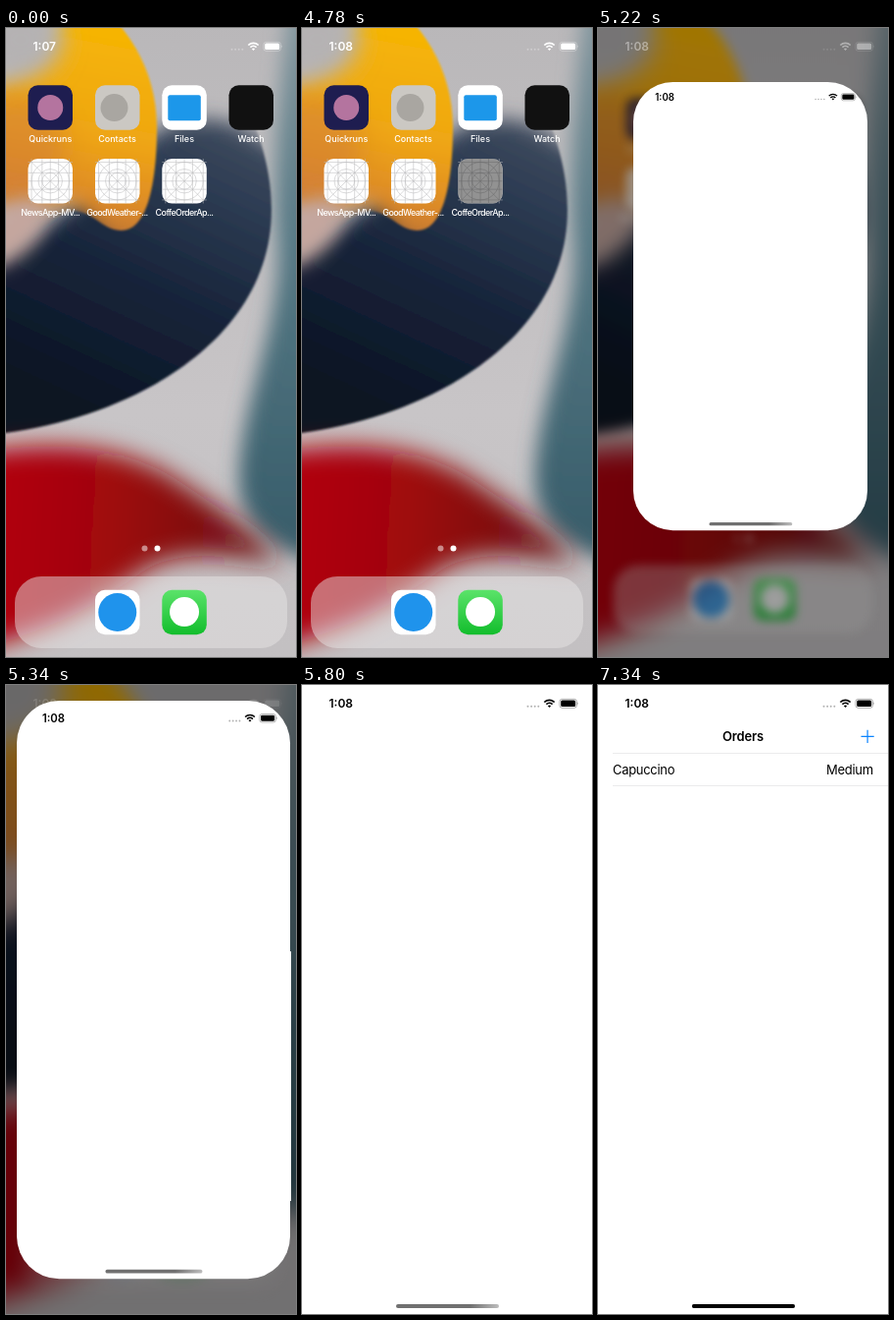
These frames come from a looping animation (296 by 640 pixels, 8 s). An HTML page:

```html
<!DOCTYPE html>
<html lang="en">
<head>
<meta charset="utf-8">
<title>App launch</title>
<style>
  html, body { margin: 0; width: 100%; height: 100%; overflow: hidden; background: #fff; }
  body { font-family: Inter, Roboto, "Liberation Sans", sans-serif; }
  svg { display: block; position: absolute; left: 0; top: 0; overflow: visible; }
  .stage { position: absolute; left: 0; top: 0; width: 296px; height: 640px; overflow: hidden; }
  .layer { position: absolute; inset: 0; }

  .wall, .home, .dim, .status, .early, .late, .press, .window, .nav, .bar-on, .rows {
    animation: 8s step-end infinite;
  }

  /* home screen */
  .wall { animation-name: wall; }
  .home { animation-name: home; }
  .dim { background: #000; animation-name: dim; }
  .status { color: #fff; animation-name: status; }
  .early { animation-name: early; }
  .late { animation-name: late; }
  .press { animation-name: press; }
  .dock {
    position: absolute; left: 9px; top: 558px; width: 278px; height: 73px;
    border-radius: 27px; background: rgba(232, 229, 230, .48); backdrop-filter: blur(9px);
  }
  .label { font-size: 9px; font-weight: 500; fill: #fff; text-anchor: middle; }
  .tight { letter-spacing: -.6px; }
  .clock { font-size: 12px; font-weight: 600; fill: currentColor; }

  /* app window */
  .window {
    position: absolute; left: 0; top: 0; width: 296px; height: 640px;
    overflow: hidden; background: #fff; color: #000;
    transform-origin: 0 0; animation-name: open;
  }
  .bar { position: absolute; left: 95.5px; bottom: 6px; width: 105px; height: 4px; border-radius: 2px; }
  .bar-off { background: linear-gradient(90deg, #707070 72%, #bdbdbd); }
  .bar-on { background: #000; animation-name: barOn; }
  .nav { animation-name: nav; }
  .rows { animation-name: rows; }
  .title { font-size: 13px; font-weight: 600; text-anchor: middle; letter-spacing: -.15px; }
  .cell { font-size: 13px; letter-spacing: -.3px; }

  @keyframes early { 0% { opacity: 1 } 18.375%, 100% { opacity: 0 } }
  @keyframes late { 0% { opacity: 0 } 18.375%, 100% { opacity: 1 } }
  @keyframes press { 0% { opacity: 0 } 59.75%, 100% { opacity: .43 } }
  @keyframes wall {
    0% { filter: none }
    63.75% { filter: blur(2px) }
    65.25% { filter: blur(6px) }
    66.75%, 100% { filter: blur(10px) }
  }
  @keyframes home {
    0% { filter: none; transform: none; opacity: 1 }
    63.75% { filter: blur(2px); transform: scale(.985); opacity: .95 }
    65.25% { filter: blur(5px); transform: scale(.952); opacity: .75 }
    66.75%, 100% { filter: blur(9px); transform: scale(.94); opacity: .5 }
  }
  @keyframes dim {
    0% { opacity: 0 }
    63.75% { opacity: .12 }
    65.25% { opacity: .35 }
    66.75% { opacity: .42 }
    68.125%, 100% { opacity: .46 }
  }
  @keyframes status {
    0% { opacity: 1 }
    63.75% { opacity: .85 }
    65.25% { opacity: .42 }
    66.75% { opacity: .15 }
    68.125%, 100% { opacity: 0 }
  }
  @keyframes open {
    0% { opacity: 0; transform: none; height: 640px; border-radius: 0 }
    63.75% { opacity: 1; transform: translate(124px, 122px) scale(.345); height: 325px; border-radius: 58px }
    65.25% { opacity: 1; transform: translate(36px, 55px) scale(.8074); height: 564.8px; border-radius: 50px }
    66.75% { opacity: 1; transform: translate(11px, 16px) scale(.9426); height: 624px; border-radius: 46px }
    68.125% { opacity: 1; transform: translate(3px, 5px) scale(.9814); height: 636px; border-radius: 43px }
    69.5% { opacity: 1; transform: translate(1px, 1.6px) scale(.9935); height: 639.2px; border-radius: 42px }
    71% { opacity: 1; transform: translate(.3px, .5px) scale(.998); height: 640px; border-radius: 42px }
    72.5%, 100% { opacity: 1; transform: none; height: 640px; border-radius: 0 }
  }
  @keyframes nav { 0% { opacity: 0 } 83.125%, 100% { opacity: 1 } }
  @keyframes barOn {
    0% { opacity: 0 }
    83.125% { opacity: .25 }
    84.625% { opacity: .5 }
    86.125% { opacity: .75 }
    87.625%, 100% { opacity: 1 }
  }
  @keyframes rows { 0% { opacity: 0 } 91.75%, 100% { opacity: 1 } }
</style>
</head>
<body>
<div class="stage">

  <svg class="wall" width="296" height="640">
    <defs>
      <filter id="b1" x="-20%" y="-20%" width="140%" height="140%"><feGaussianBlur stdDeviation="1.2"/></filter>
      <filter id="b10" x="-60%" y="-40%" width="220%" height="180%"><feGaussianBlur stdDeviation="10"/></filter>
      <filter id="b14" x="-60%" y="-60%" width="220%" height="220%"><feGaussianBlur stdDeviation="13"/></filter>
      <linearGradient id="base" x2="0" y2="1">
        <stop stop-color="#b8b6b8"/><stop offset=".6" stop-color="#c8c5c7"/><stop offset="1" stop-color="#c2bfc1"/>
      </linearGradient>
      <linearGradient id="navy" gradientUnits="userSpaceOnUse" x1="70" y1="390" x2="210" y2="90">
        <stop stop-color="#0a1322"/><stop offset=".45" stop-color="#17243a"/>
        <stop offset=".8" stop-color="#2d3c53"/><stop offset="1" stop-color="#3f4b5e"/>
      </linearGradient>
      <linearGradient id="gold" gradientUnits="userSpaceOnUse" x1="110" y1="0" x2="70" y2="215">
        <stop stop-color="#f6b504"/><stop offset=".5" stop-color="#efa613"/>
        <stop offset=".8" stop-color="#dd8a28"/><stop offset="1" stop-color="#b87038"/>
      </linearGradient>
      <linearGradient id="red" gradientUnits="userSpaceOnUse" x1="0" y1="520" x2="262" y2="535">
        <stop stop-color="#b0040e"/><stop offset=".4" stop-color="#a0070f"/>
        <stop offset=".75" stop-color="#800c11"/><stop offset="1" stop-color="#6e1a1a"/>
      </linearGradient>
      <linearGradient id="teal" gradientUnits="userSpaceOnUse" x1="0" y1="0" x2="0" y2="500">
        <stop stop-color="#7f949c"/><stop offset=".45" stop-color="#557884"/><stop offset="1" stop-color="#3a5f6c"/>
      </linearGradient>
      <clipPath id="navyEdge"><path d="M-60 420L0 412C125 396 271 320 271 185C271 130 250 90 235 50L-60-40Z"/></clipPath>
      <clipPath id="goldEdge"><path d="M70-40C125-10 154 45 154 100C154 165 142 206 118 206C100 206 92 190 72 186C45 184 20 230-60 270V-60H70Z"/></clipPath>
    </defs>
    <rect x="-40" y="-40" width="376" height="720" fill="url(#base)"/>
    <path d="M290-40C280 60 270 150 277 220C282 300 240 380 238 455C237 500 262 530 340 552V-40Z" fill="url(#teal)" filter="url(#b10)"/>
    <g filter="url(#b1)"><g clip-path="url(#navyEdge)">
      <path d="M-80 280C0 225 60 190 110 150C150 92 200 84 238 100C270 118 325 150 325 200V480H-80Z" fill="url(#navy)" filter="url(#b10)"/>
    </g></g>
    <g filter="url(#b1)"><g clip-path="url(#goldEdge)">
      <path d="M62-60C55 20 30 60-60 70V170C0 190 30 188 70 178L110 225H200V-60Z" fill="url(#gold)" filter="url(#b10)"/>
      <ellipse cx="10" cy="120" rx="50" ry="55" fill="#cf7a3c" opacity=".5" filter="url(#b14)"/>
      <ellipse cx="15" cy="12" rx="42" ry="38" fill="#b5b2b3" filter="url(#b14)"/>
    </g></g>
    <ellipse rx="44" ry="24" transform="translate(4 208) rotate(-42)" fill="#c4a69e" filter="url(#b10)"/>
    <path d="M-60 438C30 418 110 420 170 457C215 486 258 516 282 546C240 538 185 530 148 548C115 566 85 606-60 640Z" fill="url(#red)" filter="url(#b14)"/>
  </svg>

  <div class="layer home">
    <div class="dock"></div>
    <svg width="296" height="640">
      <defs>
        <rect id="tile" width="45.5" height="45.5" rx="10"/>
        <g id="blank">
          <use href="#tile" fill="#fff"/>
          <g fill="none" stroke="#bcbcbe" stroke-width=".55">
            <circle cx="22.75" cy="22.75" r="19.2"/>
            <circle cx="22.75" cy="22.75" r="12.2"/>
            <circle cx="22.75" cy="22.75" r="8.4"/>
            <path d="M0 22.75H45.5M22.75 0V45.5M3 3L42.5 42.5M42.5 3L3 42.5M0 14.35H45.5M0 31.15H45.5M14.35 0V45.5M31.15 0V45.5M0 3.55H45.5M0 41.95H45.5M3.55 0V45.5M41.95 0V45.5"/>
          </g>
        </g>
        <linearGradient id="green" x2="0" y2="1"><stop stop-color="#5be36a"/><stop offset="1" stop-color="#12bd2c"/></linearGradient>
      </defs>
      <g transform="translate(22.5 58.3)">
        <use href="#tile" fill="#1e1d50"/><circle cx="22.75" cy="22.75" r="13" fill="#b4749f"/>
      </g>
      <g transform="translate(91 58.3)">
        <use href="#tile" fill="#cbc8c3"/><circle cx="19.5" cy="22.75" r="14" fill="#a9a6a1"/>
      </g>
      <g transform="translate(159.3 58.3)">
        <use href="#tile" fill="#fff"/><rect x="6" y="10" width="33.5" height="26" rx="2" fill="#1c97ea"/>
      </g>
      <use href="#tile" x="227.5" y="58.3" fill="#111"/>
      <use href="#blank" x="22.5" y="133"/>
      <use href="#blank" x="91" y="133"/>
      <use href="#blank" x="159.3" y="133"/>
      <use class="press" href="#tile" x="159.3" y="133" fill="#000"/>
      <g class="label">
        <text x="45.3" y="116.3">Quickruns</text>
        <text x="113.5" y="116.3">Contacts</text>
        <text x="182" y="116.3">Files</text>
        <text x="250" y="116.3">Watch</text>
        <g class="tight">
          <text x="45.2" y="190.5">NewsApp-MV...</text>
          <text x="113.5" y="190.5">GoodWeather-...</text>
          <text x="182" y="190.5">CoffeOrderAp...</text>
        </g>
      </g>
      <g fill="#fff">
        <circle cx="141.5" cy="529.5" r="3" opacity=".5"/><circle cx="154.5" cy="529.5" r="3"/>
      </g>
      <g transform="translate(91 571.8)">
        <use href="#tile" fill="#fff"/><circle cx="22.75" cy="22.75" r="19.5" fill="#1f93ec"/>
      </g>
      <g transform="translate(159.3 571.8)">
        <use href="#tile" fill="url(#green)"/><circle cx="22.75" cy="22.25" r="15" fill="#fff"/>
      </g>
    </svg>
  </div>

  <div class="layer dim"></div>

  <svg class="status" width="296" height="40">
    <defs>
      <g id="signals">
        <g fill="currentColor" opacity=".3">
          <circle cx="230.5" cy="21.7" r="1"/><circle cx="234.1" cy="21.7" r="1"/>
          <circle cx="237.7" cy="21.7" r="1"/><circle cx="241.3" cy="21.7" r="1"/>
        </g>
        <g fill="none" stroke="currentColor" stroke-width="1.7">
          <path d="M247.3 17.5A7.4 7.4 0 0 1 257.7 17.5M249.4 19.7A4.4 4.4 0 0 1 255.6 19.7"/>
        </g>
        <path d="M250.9 21.2A2.3 2.3 0 0 1 254.1 21.2L252.5 22.9Z" fill="currentColor"/>
        <rect x="262.9" y="14.3" width="17.6" height="9" rx="2.7" fill="none" stroke="currentColor" stroke-width=".8" opacity=".4"/>
        <rect x="264.2" y="15.6" width="15" height="6.4" rx="1.5" fill="currentColor"/>
        <path d="M281.3 17.3Q282.7 18.8 281.3 20.3Z" fill="currentColor" opacity=".45"/>
      </g>
    </defs>
    <g class="clock">
      <text class="early" x="27.5" y="23.2">1:07</text>
      <text class="late" x="27.5" y="23.2">1:08</text>
    </g>
    <use href="#signals"/>
  </svg>

  <div class="window">
    <svg width="296" height="120">
      <text class="clock" x="27.5" y="23.2">1:08</text>
      <use href="#signals"/>
      <g class="nav">
        <text class="title" x="148" y="56.7">Orders</text>
        <path d="M268.5 52.3H281.7M275.1 45.7V58.9" stroke="#0a84ff" stroke-width="1.2"/>
      </g>
      <g class="rows">
        <path d="M15 69.5H296M15 102.5H296" stroke="#e6e6e8" stroke-width=".8"/>
        <text class="cell" x="15" y="90.7">Capuccino</text>
        <text class="cell" x="280.8" y="90.7" text-anchor="end">Medium</text>
      </g>
    </svg>
    <div class="bar bar-off"></div>
    <div class="bar bar-on"></div>
  </div>

</div>
</body>
</html>
```
